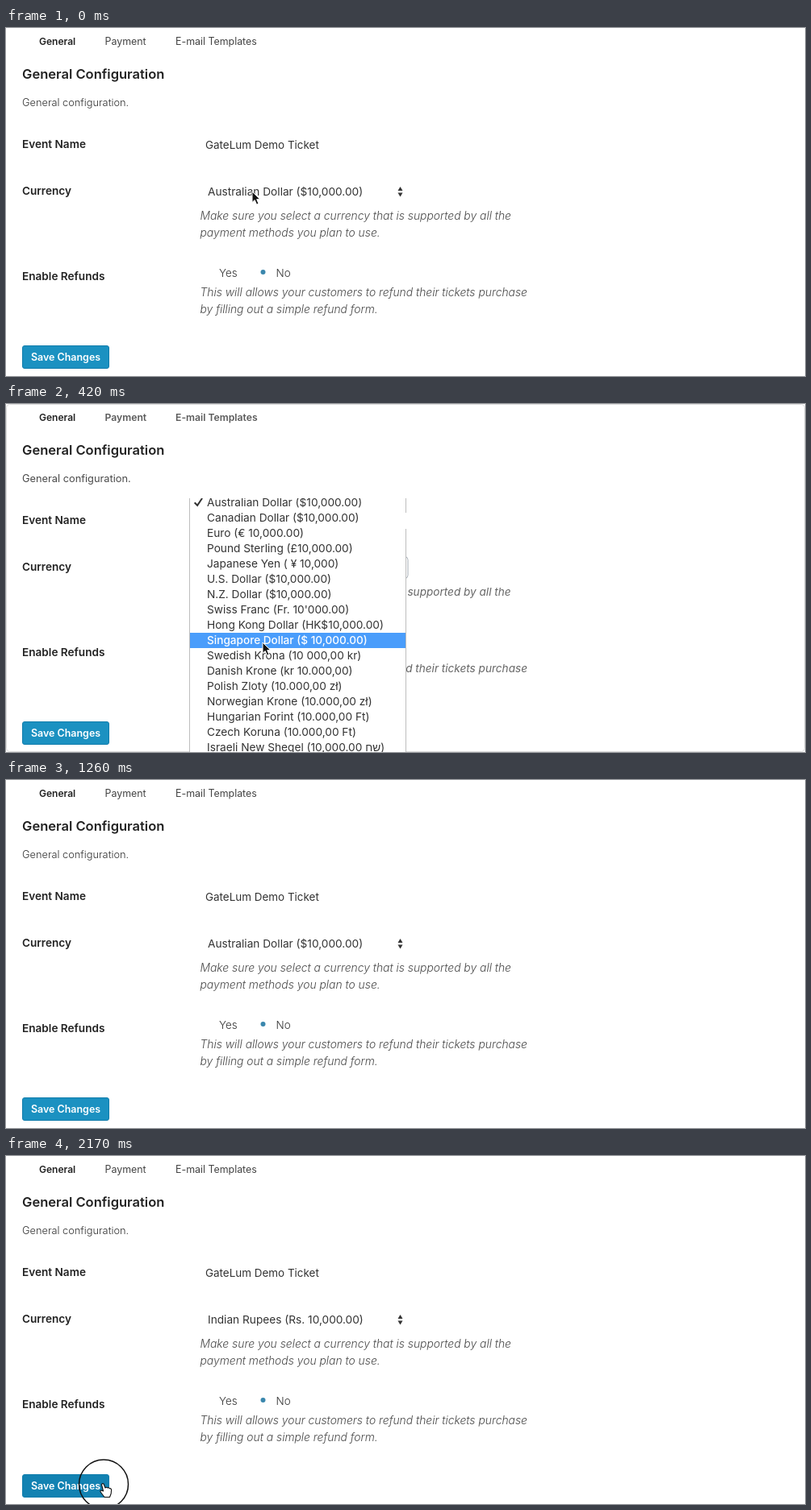
Recreate the animation shown at these times as an HTML page. Size 990x432 px, loop 2.24 s.

```html
<!DOCTYPE html>
<html lang="en">
<head>
<meta charset="utf-8">
<title>Ticket settings</title>
<style>
html, body { margin: 0; width: 100%; height: 100%; overflow: hidden; background: #fff; }
svg { display: block; width: 990px; height: 432px; font: 13.68px Inter, "Noto Sans", sans-serif; fill: #333; }

/* One loop is 32 ticks of 70 ms; a tick is 3.125%. */
.tab, .hint, .copy, .title, .open, .aud, .inr, .ring, .press, .arrow, .beam, .hand {
  animation: 2240ms step-end infinite;
}
.list, .row, .back, .ptr { animation: 2240ms linear infinite; }

.bold { font-weight: 600; font-size: 13.6px; fill: #222; }
.head { font-weight: 600; font-size: 16.55px; fill: #222; }

/* Page text is lighter while the menu is closed. */
.tab { animation-name: tab; }
@keyframes tab {
  0%, 53.125% { font-weight: 400; font-size: 12.4px; fill: #444; }
  3.125% { font-weight: 600; font-size: 12.2px; fill: #5a5a5a; }
}
.hint { font-style: italic; animation-name: hint; }
@keyframes hint {
  0%, 53.125% { font-weight: 300; font-size: 13.86px; fill: #4a4a4a; }
  3.125% { font-weight: 400; font-size: 13.58px; fill: #666; }
}
.copy { font-size: 12.8px; animation-name: copy; }
@keyframes copy {
  0%, 53.125% { font-weight: 300; fill: #333; }
  3.125% { font-weight: 400; fill: #4a4a4a; }
}

.title { font-size: 29.7px; font-weight: 800; text-anchor: middle; animation-name: title; }
@keyframes title { 0%, 15.625% { visibility: hidden; } 3.125% { visibility: visible; } }

.open { animation-name: open; }
@keyframes open { 0%, 53.125% { visibility: hidden; } 6.25% { visibility: visible; } }
.aud { animation-name: aud; }
@keyframes aud { 0% { visibility: visible; } 59.375%, 100% { visibility: hidden; } }
.inr { animation-name: inr; }
@keyframes inr { 0% { visibility: hidden; } 59.375%, 100% { visibility: visible; } }

/* The list slides up while the highlight walks down nine rows. */
.list { animation-name: list; }
@keyframes list {
  0% { transform: none; }
  9.375% { transform: translateY(0); animation-timing-function: steps(3); }
  18.75%, 100% { transform: translateY(-83px); }
}
.row { animation-name: row; }
@keyframes row {
  0% { transform: none; }
  9.375% { transform: translateY(0); animation-timing-function: steps(3); }
  18.75%, 100% { transform: translateY(171px); }
}
.back { font-size: 13.6px; font-weight: 500; animation-name: back; }
@keyframes back {
  0% { transform: none; }
  9.375% { transform: translateY(0); animation-timing-function: steps(3); }
  18.75%, 100% { transform: translateY(-171px); }
}

.ptr { animation-name: ptr; }
@keyframes ptr {
  0% { transform: translate(305px, 203px); }
  9.375% { transform: translate(305px, 203px); animation-timing-function: steps(3); }
  18.75% { transform: translate(318px, 296px); }
  53.125% { transform: translate(318px, 296px); animation-timing-function: step-end; }
  62.5% { transform: translate(290px, 206px); }
  71.875% { transform: translate(290px, 206px); animation-timing-function: steps(2); }
  78.125% { transform: translate(252px, 254px); animation-timing-function: steps(5); }
  93.75%, 100% { transform: translate(121px, 407px); }
}
.arrow { animation-name: arrow; }
@keyframes arrow {
  0%, 62.5%, 84.375% { visibility: visible; }
  53.125%, 75%, 90.625%, 100% { visibility: hidden; }
}
.beam { animation-name: beam; }
@keyframes beam { 0%, 84.375% { visibility: hidden; } 75% { visibility: visible; } }
.hand { animation-name: hand; }
@keyframes hand { 0% { visibility: hidden; } 90.625%, 100% { visibility: visible; } }

.ring { fill: none; stroke: #111; stroke-width: 1.5; }
.tap1 { animation-name: tap1; }
@keyframes tap1 {
  0%, 12.5% { visibility: hidden; r: 21.5px; }
  6.25% { visibility: visible; r: 21.5px; }
  9.375% { visibility: visible; r: 30.5px; }
}
.tap2 { animation-name: tap2; }
@keyframes tap2 {
  0% { visibility: hidden; r: 21.5px; }
  93.75% { visibility: visible; r: 21.5px; }
  96.875%, 100% { visibility: visible; r: 30.5px; }
}
.press { animation-name: press; }
@keyframes press {
  0% { transform: none; fill: #1b91c1; }
  93.75%, 100% { transform: translateY(1px); fill: #1282b2; }
}
</style>
</head>
<body>
<svg viewBox="0 0 990 432" xmlns="http://www.w3.org/2000/svg">
  <defs>
    <clipPath id="screen"><rect x="227" y="117" width="270" height="315"/></clipPath>
    <clipPath id="band"><rect x="228" y="196" width="267" height="19"/></clipPath>
    <g id="items">
      <text y="191">
        <tspan x="249" dy="19">Australian Dollar ($10,000.00)</tspan>
        <tspan x="249" dy="19">Canadian Dollar ($10,000.00)</tspan>
        <tspan x="249" dy="19">Euro (€ 10,000.00)</tspan>
        <tspan x="249" dy="19">Pound Sterling (£10,000.00)</tspan>
        <tspan x="249" dy="19">Japanese Yen ( ¥ 10,000)</tspan>
        <tspan x="249" dy="19">U.S. Dollar ($10,000.00)</tspan>
        <tspan x="249" dy="19">N.Z. Dollar ($10,000.00)</tspan>
        <tspan x="249" dy="19">Swiss Franc (Fr. 10'000.00)</tspan>
        <tspan x="249" dy="19">Hong Kong Dollar (HK$10,000.00)</tspan>
        <tspan x="249" dy="19">Singapore Dollar ($ 10,000.00)</tspan>
        <tspan x="249" dy="19">Swedish Krona (10 000,00 kr)</tspan>
        <tspan x="249" dy="19">Danish Krone (kr 10.000,00)</tspan>
        <tspan x="249" dy="19">Polish Zloty (10.000,00 zł)</tspan>
        <tspan x="249" dy="19">Norwegian Krone (10.000,00 zł)</tspan>
        <tspan x="249" dy="19">Hungarian Forint (10.000,00 Ft)</tspan>
        <tspan x="249" dy="19">Czech Koruna (10.000,00 Ft)</tspan>
        <tspan x="249" dy="19">Israeli New Sheqel (10,000.00 שח)</tspan>
      </text>
      <path d="M232.8 206l1.8-1.3 2.4 2.6 5.2-7.8 1.7 1-6.6 10z"/>
    </g>
  </defs>

  <rect width="990" height="432" fill="#fff"/>
  <rect class="open" x=".5" y=".5" width="989" height="431" rx="4" fill="none" stroke="#dcdcdc"/>

  <text class="bold" x="41" y="21" style="font-size:12px">General</text>
  <text class="tab" x="122.5" y="21">Payment</text>
  <text class="tab" x="210" y="21">E-mail Templates</text>
  <text class="head" x="20" y="63">General Configuration</text>
  <text class="copy" x="20" y="97">General configuration.</text>

  <text class="bold" x="20" y="149">Event Name</text>
  <text x="247" y="149.5" font-size="13.45">GateLum Demo Ticket</text>

  <text class="bold" x="20" y="207">Currency</text>
  <rect class="open" x="241.5" y="189.5" width="256.5" height="27" rx="4" fill="#fff" stroke="#a5adb5"/>
  <text class="aud" x="250" y="208">Australian Dollar ($10,000.00)</text>
  <text class="inr" x="250" y="208">Indian Rupees (Rs. 10,000.00)</text>
  <path d="M485.5 202l3-5 3 5zM485.5 204.5h6l-3 5z"/>
  <text class="hint" x="240.5" y="238">Make sure you select a currency that is supported by all the</text>
  <text class="hint" x="240.5" y="259">payment methods you plan to use.</text>

  <text class="bold" x="20" y="313">Enable Refunds</text>
  <text class="copy" x="264" y="309" style="font-size:13.4px">Yes</text>
  <circle cx="318.5" cy="303" r="3" fill="#3a87ad"/>
  <text class="copy" x="334.5" y="309" style="font-size:13.4px">No</text>
  <text class="hint" x="240.5" y="333">This will allows your customers to refund their tickets purchase</text>
  <text class="hint" x="240.5" y="354">by filling out a simple refund form.</text>

  <g class="press">
    <rect x="20.5" y="394.5" width="107" height="28" rx="2.5" stroke="#117dac"/>
    <text x="31" y="413" fill="#fff" font-size="12.45" font-weight="600">Save Changes</text>
  </g>

  <g class="open" clip-path="url(#screen)">
    <g class="list">
      <rect x="227" y="194" width="269" height="360" fill="#fff"/>
      <path d="M227.5 196V552M495.5 196V552" stroke="#bdbdbd"/>
      <use href="#items"/>
      <g class="row" clip-path="url(#band)">
        <rect x="228" y="196" width="267" height="19" fill="#4a9dfb"/>
        <use class="back" href="#items" fill="#fff"/>
      </g>
    </g>
    <rect x="495" y="135" width="2" height="20" fill="#fff"/>
  </g>

  <g class="title">
    <text x="696.5" y="42.5" fill="#a0a0a0" stroke="#a0a0a0" stroke-width="2">GateLum Quickzavo INR Activation</text>
    <text x="693" y="39" fill="#fff" stroke="#444" stroke-width="2.4" paint-order="stroke">GateLum Quickzavo INR Activation</text>
  </g>

  <circle class="ring tap1" cx="305" cy="205" r="21.5"/>
  <circle class="ring tap2" cx="121" cy="407.5" r="21.5"/>

  <g class="ptr" stroke-linejoin="round">
    <path class="arrow" d="M0 0V13.5L3.2 10.6 5.6 16.2 8 15.1 5.7 9.7H9.8Z" fill="#111" stroke="#fff" stroke-width="1"/>
    <path class="beam" d="M-3.5-7.5Q0-7.5 0-5V5Q0 7.5-3.5 7.5M3.5-7.5Q0-7.5 0-5V5Q0 7.5 3.5 7.5M-2 2H2" fill="none" stroke="#111" stroke-width="1.4"/>
    <path class="hand" d="M-2.5 1Q-2-1 0 0L2 5Q3.5 3.5 4.8 5 6.3 4 7.3 5.7 9 5.2 9.6 7.2L9.2 12 7.5 16.5H1L-3.5 10.5Q-5 8.5-3 8L-.5 9Z" fill="#fff" stroke="#111" stroke-width="1.1"/>
  </g>
</svg>
</body>
</html>
```
